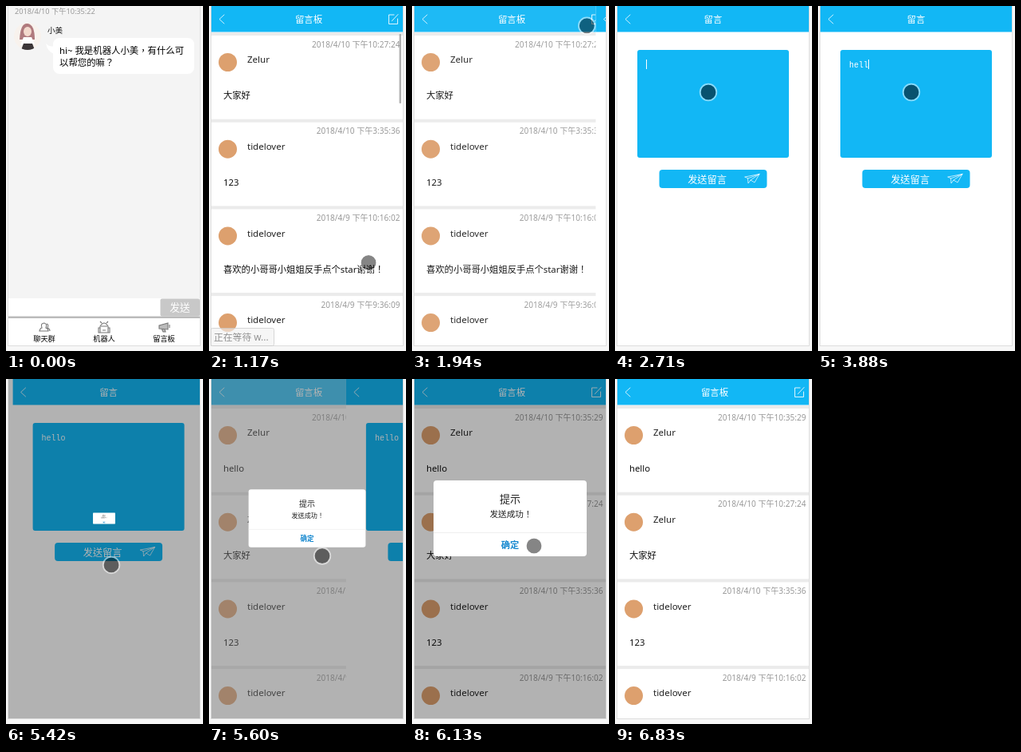
An HTML page for the animation above (7440 ms loop, 247 by 432 pixels).

```html
<!DOCTYPE html>
<html lang="zh-Hant">
<head>
<meta charset="utf-8">
<style>
  html, body { margin: 0; width: 100%; height: 100%; overflow: hidden; background: #f7f7f7; }
  svg { display: block; width: 247px; height: 432px; font-family: "Noto Sans", "Noto Sans CJK TC", sans-serif; text-spacing-trim: space-all; }
  .line { fill: none; stroke: #fff; stroke-linecap: round; stroke-linejoin: round; }
</style>
</head>
<body>
<svg id="stage" viewBox="0 0 247 432"></svg>
<script>
const LOOP = 7440, BLUE = '#12b7f5', ROW = 108.7;

const clamp = v => Math.min(1, Math.max(0, v));
const ramp = (t, from, to) => clamp((t - from) / (to - from));
const easeInOut = p => p < .5 ? 4 * p ** 3 : 1 - 4 * (1 - p) ** 3;
const easeOut = p => 1 - (1 - p) ** 2;
const between = (t, from, to) => t >= from && t < to;

// y is the vertical middle of the line
const text = (x, y, size, fill, str, attrs = '') =>
  `<text x="${x}" y="${y + size * .37}" font-size="${size}" fill="${fill}" ${attrs}>${str}</text>`;
const middle = 'text-anchor="middle"';
const rect = (x, y, w, h, fill, attrs = '') =>
  `<rect x="${x}" y="${y}" width="${w}" height="${h}" fill="${fill}" ${attrs}/>`;

const header = (title, x) => rect(3, 0, 240, 32.5, BLUE) +
  '<path class="line" d="M19 11L13 16.5L19 22" stroke-width=".8"/>' +
  text(x, 17, 11.4, '#fff', title, middle);

const posts = [
  ['2018/4/10 下午10:35:29', 'Zelur', 'hello'],
  ['2018/4/10 下午10:27:24', 'Zelur', '大家好'],
  ['2018/4/10 下午3:35:36', 'tidelover', '123'],
  ['2018/4/9 下午10:16:02', 'tidelover', '喜欢的小哥哥小姐姐反手点个star谢谢！'],
  ['2018/4/9 下午9:36:09', 'tidelover', '']
];

const postRow = ([date, name, body], i) => `<g transform="translate(0 ${i * ROW})">` +
  rect(3, 33, 240, 4, '#ebebeb') +
  text(239.4, 48, 10.05, '#999', date, 'text-anchor="end"') +
  '<circle cx="23.5" cy="70.500" r="11.5" fill="#dda06e"/>' +
  text(48, 67, 11.5, '#222', name) +
  text(18, 112, 11.3, '#111', body) + '</g>';

const board = (id, list) => `<g id="${id}">` + rect(3, 0, 240, 425, '#fff') +
  list.map(postRow).join('') + header('留言板', 125) +
  '<path class="line" d="M232 11H225.5V22.5H236.5V16M229.5 18.5L237 10.5" stroke-opacity=".85"/></g>';

const tab = (x, label, icon) =>
  `<g transform="translate(${x} 402)" fill="none" stroke="#777" stroke-width="1.1">${icon}</g>` +
  text(x, 417, 9.2, '#000', label, middle);

const chat = '<g id="chat">' + rect(3, 0, 240, 366, '#f4f4f4') +
  text(11, 7, 9.2, '#999', '2018/4/10 下午10:35:22') +
  `<clipPath id="round"><circle cx="27" cy="38" r="17"/></clipPath>
   <g clip-path="url(#round)">${rect(10, 21, 34, 34, '#f8f2ed')}
     <path d="M17 42Q18 21 27 22Q36 23 36 42Z" fill="#b07a7e"/>
     <ellipse cx="27" cy="32" rx="5" ry="6" fill="#f3d9cd"/>
     <path d="M18 49L22 39H32L36 48Z" fill="#fff"/>
     <path d="M19 55L22 47H33L36 55Z" fill="#3c3638"/>
   </g>` +
  text(52, 30, 9.6, '#111', '小美') +
  '<path d="M50 47Q55 52 60 50V60Q52 57 50 47Z" fill="#fff"/>' +
  rect(59, 40, 177, 45, '#fff', 'rx="8"') +
  text(67, 56, 11.4, '#000', 'hi~ 我是机器人小美，有什么可') +
  text(67, 71, 11.4, '#000', '以帮您的嘛？') +
  rect(3, 366, 240, 59, '#fff') +
  rect(193.5, 366.5, 49.5, 22, '#c8c8c8', 'rx="2"') +
  text(218, 377.5, 12.8, '#fff', '发送', middle) +
  rect(3, 388.5, 240, 2.5, '#bbb') +
  tab(48, '聊天群', '<path d="M-6 5Q-5 1 -3 1Q-5 -5 0 -5Q4 -4 2 1Q5 2 5 5ZM3 -4Q6 -3 4 1Q7 2 7 5"/>') +
  tab(123, '机器人', '<path d="M-5 7V-1Q0 -9 5 -1V7ZM-5 1H-7V7H7V1H5M-2 4H2M-4 -1H4M-5 -7L-3 -5M5 -7L3 -5"/>') +
  tab(198, '留言板', '<path d="M-6 -2L5 -5V3L-6 2ZM-3 2L-1 6H2L1 3M7 -3V1" fill="#bbb"/>') + '</g>';

const editor = '<g id="editor">' + rect(3, 0, 240, 425, '#fff') + header('留言', 123) +
  rect(28, 55, 190, 135, BLUE, 'rx="3"') +
  '<text id="typed" x="39" y="77" font-size="10" fill="#fff" font-family="Liberation Mono, monospace"></text>' +
  rect(39, 67, 1, 12, '#fff', 'id="caret"') +
  rect(55.5, 205, 135, 23, BLUE, 'rx="4"') +
  text(115.5, 217, 12.2, '#fff', '发送留言', middle) +
  '<path class="line" d="M163 214L181 210.5L175 221L170 218L167 222L166.500 216ZM181 210.5L166.500 216M181 210.5L170 218" stroke-width=".7"/></g>';

const dialog = '<g id="dialog">' + rect(27, 127, 192, 95, '#fff', 'rx="4"') +
  text(123, 150.5, 13, '#222', '提示', middle) +
  text(124, 169.5, 10.6, '#222', '发送成功！', middle) +
  rect(27, 192, 192, 1, '#eee') +
  text(123, 208, 11.2, '#1688cf', '确定', middle + ' font-weight="700"') + '</g>';

document.getElementById('stage').innerHTML =
  '<clipPath id="screen"><rect x="3" width="240" height="425"/></clipPath>' +
  rect(2.5, -2, 241, 427.5, '#fff', 'stroke="#dedede"') +
  '<g clip-path="url(#screen)">' + chat + board('oldBoard', posts.slice(1)) + board('newBoard', posts.slice(0, 4)) +
  rect(238.5, 35, 2.5, 87, '#888', 'id="scrollbar" rx="1"') + editor +
  rect(3, 0, 240, 425, '#000', 'id="shade"') + dialog + '</g>' +
  '<g id="status">' + rect(2.5, 403.5, 79, 22, '#f2f2f2', 'stroke="#ccc" rx="2" fill-opacity=".8"') +
  text(6, 415, 11.8, '#777', '正在等待 w...') + '</g>' +
  '<g id="pointer"><circle r="9.5"/><circle r="10.3" fill="none" stroke="#fff" stroke-opacity=".5" stroke-width="1.8"/></g>';

const el = Object.fromEntries([...document.querySelectorAll('#stage [id]')].map(e => [e.id, e]));
const set = (id, name, value) => el[id].setAttribute(name, value);
const show = (id, alpha) => {
  set(id, 'opacity', +alpha);
  set(id, 'display', alpha > 0 ? 'inline' : 'none');
};

// time, x, y
const path = [
  [300, 200, 440], [610, 200, 412], [1050, 200, 412], [1170, 200, 322], [1680, 230, 16],
  [1900, 230, 16], [2330, 117, 108], [4630, 117, 108], [4810, 126, 194], [5100, 129, 234],
  [5270, 129, 234], [5420, 132, 233], [5800, 153, 209], [LOOP, 153, 209]
];
const keys = [3180, 3350, 3710, 3880, 4030];

function pointerAt(t) {
  const i = Math.max(1, path.findIndex(p => p[0] > t));
  const [t0, x0, y0] = path[i - 1], [t1, x1, y1] = path[i];
  const p = ramp(t, t0, t1);
  return [x0 + (x1 - x0) * p, y0 + (y1 - y0) * p];
}

function render(t) {
  const editing = easeInOut(ramp(t, 1830, 2300)) - easeInOut(ramp(t, 5340, 5790));
  show('chat', t < 900);
  show('oldBoard', between(t, 900, 4000) ? 1 - editing : 0);
  show('newBoard', t >= 4000 ? 1 - editing : 0);
  show('editor', editing > 0);
  set('editor', 'transform', `translate(${240 * (1 - editing)} 0)`);

  const count = keys.filter(k => k <= t).length;
  el.typed.textContent = 'hello'.slice(0, count);
  set('caret', 'x', 39 + count * 6);
  show('caret', between(t, 2480, 3010) || between(t, 3180, 4490) || between(t, 4990, 5270));

  show('scrollbar', .65 * (between(t, 900, 1750) ? 1 - ramp(t, 1350, 1700) : t > 5790 ? 1 - ramp(t, 5900, 6120) : 0));
  show('status', t >= 900 ? 1 - ramp(t, 1100, 1450) : 0);

  const closing = ramp(t, 6410, 6820);
  show('shade', .3 * ramp(t, 5240, 5400) * (1 - closing));
  const scale = easeOut(ramp(t, 5390, 5800)) * (1 - closing ** 2);
  show('dialog', scale > 0 ? 1 - closing : 0);
  set('dialog', 'transform', `translate(123 174.5) scale(${scale}) translate(-123 -174.5)`);

  show('pointer', t >= 300 ? 1 - ramp(t, 6560, 6820) : 0);
  set('pointer', 'transform', `translate(${pointerAt(t)})`);
  set('pointer', 'fill-opacity', between(t, 2710, 4630) ? .55 : .48);
}

function tick() {
  render(performance.now() % LOOP);
  requestAnimationFrame(tick);
}
tick();
</script>
</body>
</html>
```
